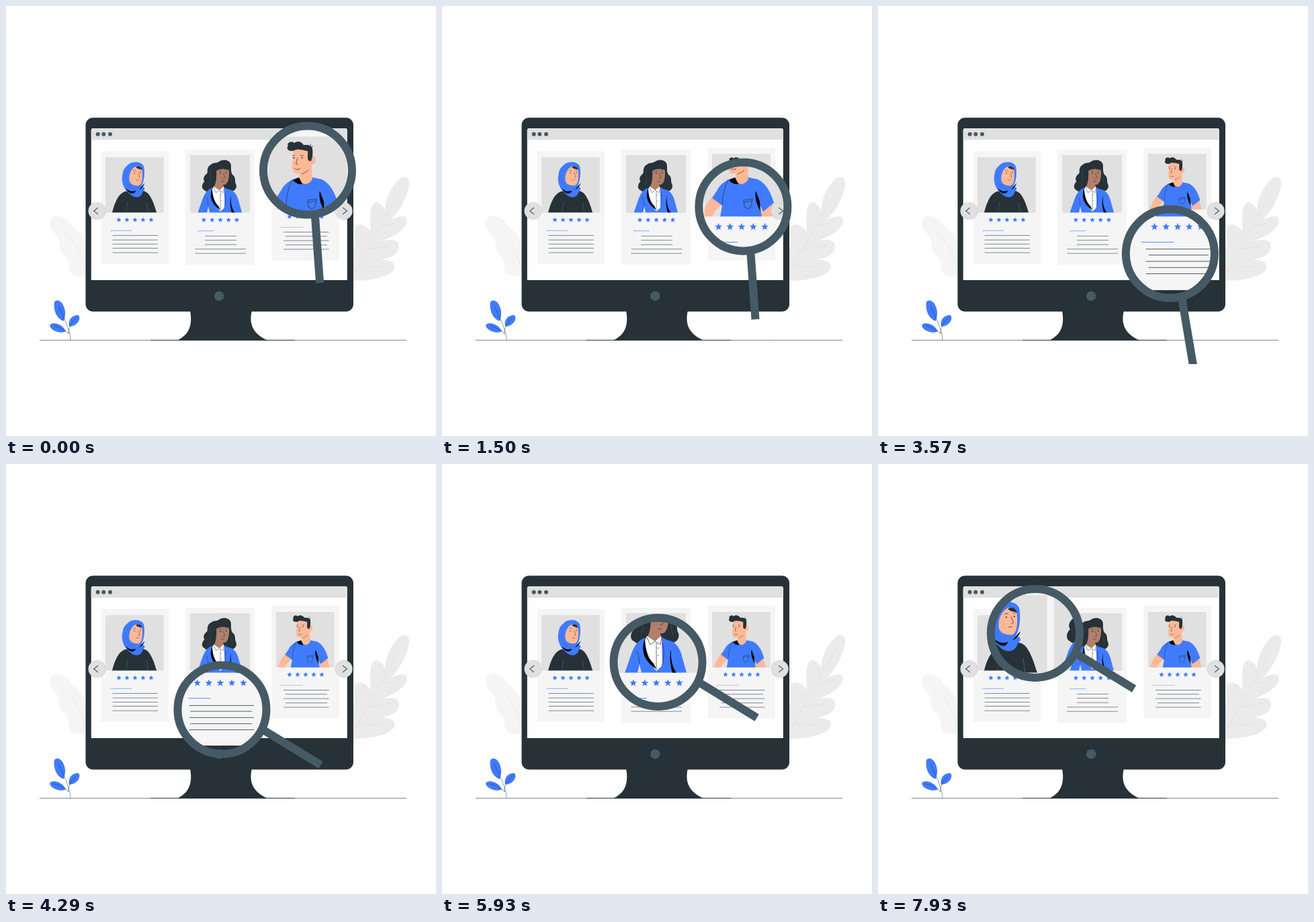
These frames come from a looping animation (640 by 640 pixels, 8 s). An HTML page with a canvas:

```html
<!DOCTYPE html>
<html lang="en">
<head>
<meta charset="utf-8">
<title>Profile search</title>
<style>
html, body { margin: 0; width: 100%; height: 100%; overflow: hidden; background: #fff; }
canvas { display: block; width: 640px; height: 640px; }
</style>
</head>
<body>
<canvas id="stage"></canvas>
<script>
const canvas = document.getElementById('stage');
const ctx = canvas.getContext('2d');
const ratio = window.devicePixelRatio || 1;
canvas.width = canvas.height = 640 * ratio;

const BLUE = '#407bff', DARK = '#263238', SLATE = '#455a64', PALE = '#f5f5f5',
  GREY = '#e0e0e0', BLACK = '#000', SKIN = '#ffb997', BROWN = '#b17f6b';
const LOOP = 8000, FPS = 14;

function fill(d, color) {
  ctx.fillStyle = color;
  ctx.fill(new Path2D(d));
}

function line(d, color = DARK, width = 0.7) {
  ctx.strokeStyle = color;
  ctx.lineWidth = width;
  ctx.stroke(new Path2D(d));
}

function box(x0, y0, x1, y1, color) {
  ctx.fillStyle = color;
  ctx.fillRect(x0, y0, x1 - x0, y1 - y0);
}

function roundBox(x0, y0, x1, y1, radii, color) {
  ctx.fillStyle = color;
  ctx.beginPath();
  ctx.roundRect(x0, y0, x1 - x0, y1 - y0, radii);
  ctx.fill();
}

function dot(x, y, r, color) {
  ctx.fillStyle = color;
  ctx.beginPath();
  ctx.arc(x, y, r, 0, Math.PI * 2);
  ctx.fill();
}

function star(x, y, r) {
  ctx.fillStyle = BLUE;
  ctx.beginPath();
  for (let i = 0; i < 10; i++) {
    const a = i * Math.PI / 5 - Math.PI / 2, q = i % 2 ? r * 0.45 : r;
    ctx.lineTo(x + q * Math.cos(a), y + q * Math.sin(a));
  }
  ctx.fill();
}

function zoom(x, y, s) {
  ctx.translate(x, y);
  ctx.scale(s, s);
  ctx.translate(-x, -y);
}

// Portraits are drawn at their magnified size.
function veiledWoman() {
  fill('M144 311C148 296 153 281 161 273Q170 264 180 266L206 265Q216 266 221 273C229 284 233 298 237 311Z', DARK);
  line('M177 288Q174 299 173 311M216 289L219 311', '#6b767b', 0.6);
  fill('M176 212C184 203 204 202 210 214C213 228 211 245 205 256C213 257 214 262 208 267C205 280 191 283 180 271C168 262 162 245 166 230C167 222 170 216 176 212Z', BLUE);
  fill('M194 214C203 214 206 219 207 225C208 240 206 252 200 254C190 255 182 252 180 244C178 232 184 218 194 214Z', SKIN);
  fill('M193 216C199 211 205 215 207 221L198 219Z', DARK);
  fill('M173 260C180 267 187 267 194 265L190 270C183 272 177 268 173 260Z', BLACK);
  fill('M212 249Q210 257 200 263Q207 254 212 249Z', BLACK);
  line('M172 232C170 244 176 254 186 260', '#2c5fd0', 0.5);
  dot(191, 228, 1.1, DARK);
  dot(203, 227, 1.1, DARK);
  line('M188 224Q191 221 194 223M201 222L205 222M198 227L202 236L198 238M194 242Q197 244 200 242');
}

function curlyWoman() {
  fill('M299 211C304 205 312 209 318 203C328 199 338 201 341 210C342 220 340 228 346 233C352 238 348 246 352 252C355 262 344 270 336 264C330 271 322 266 318 262L304 262C298 270 290 268 286 264C278 261 281 250 286 246C281 238 288 232 292 228C292 220 293 214 299 211Z', DARK);
  fill('M311 223Q323 217 337 222C338 236 336 246 331 251Q327 253 325 252L326 260L318 268L305 258C311 250 311 234 311 223Z', BROWN);
  fill('M305 256L300 266L318 306L321 310L328 302V262L326 256L317 264Z', '#fff');
  fill('M302 259C292 262 286 270 281 285L272 311H364L356 282C352 270 345 263 335 262L327 258L328 300L319 308C311 300 303 280 302 259Z', BLUE);
  fill('M291 311L294 298L297 311Z', GREY);
  fill('M302 260C296 276 299 292 319 305L315 297C306 289 302 276 302 260Z', BLACK);
  fill('M341 275C340 289 342 301 349 311H343C340 301 338 286 341 275Z', BLACK);
  line('M305 258L310 269L317 264L325 269L327 258M319 266V306M328 266Q333 284 327 301M294 297Q293 284 290 278');
  dot(321.5, 274, 0.7, DARK);
  dot(321.5, 285, 0.7, DARK);
  dot(319, 229, 1.2, DARK);
  dot(331, 228, 1.2, DARK);
  line('M315 225Q319 222 322 225M328 224L333 223M325 228L329 238L324 240M321 245Q324 247 327 245');
  line('M300 218C294 232 303 240 296 254M342 236Q340 246 345 256', '#4d5b62', 0.5);
}

function man() {
  fill('M404 281C396 291 389 302 387 314H402C404 306 412 300 418 294Z', SKIN);
  fill('M474 303L492 294L498 314H476Z', SKIN);
  fill('M430 257C421 261 415 264 409 275L402 286L417 297C416 303 415 308 414 314H476L473 296L478 306L494 293C490 280 484 265 470 258L456 255Q446 267 437 256Z', BLUE);
  fill('M428 210L426 238C425 247 430 251 437 249L437 260Q447 271 456 258L455 236C461 237 464 226 457 223L452 210Z', SKIN);
  fill('M429 215C421 218 416 212 420 208C417 203 426 200 429 204C434 200 440 202 443 207C450 206 455 208 456 212C457 220 456 226 454 231L450 230C448 225 450 220 449 216C440 214 434 212 429 215Z', DARK);
  line('M454 210L453 205M455 211L457 208');
  fill('M427 259L436 255L441 265Q432 266 427 259Z', BLACK);
  fill('M467 275C465 285 469 298 474 305L473 291Z', BLACK);
  line('M426 258C421 268 418 280 417 296M449 289L462 287L460 299L455 302L450 299ZM449 292L461 290');
  dot(428.5, 226, 1.1, DARK);
  dot(440.5, 226, 1.1, DARK);
  line('M426 223L430 222M438 222L443 223M434 226L431.5 235L435 236M430 242Q434 245 438 242M440 250Q447 248 450 244');
}

// s, fx, fy: magnification and the point it grows from.
const cards = [
  { frame: [395.5, 211, 496, 379], photo: [402, 220, 488.7, 302.8], stars: [422, 12, 313.5],
    title: [408, 442, 329.3], titleColor: '#9aa0a3', rows: [336.5, 342.7, 349.2, 355.6, 362],
    spans: i => i % 2 ? [416, 478] : [413, 480.5], s: 1.4375, fx: 446, fy: 278.7, person: man },
  { frame: [267, 214, 370, 385], photo: [274, 222, 363, 307.5], stars: [294.5, 12.25, 318.5],
    title: [285, 309, 334.7], rows: [342.4, 348.6, 355.2, 361.8, 368.2],
    spans: (i, big) => big ? (i % 2 ? [287, 352.5] : [286, 354.7]) : i < 3 ? [296, 343] : [281.5, 357],
    s: 1.4, fx: 319, fy: 299.8, person: curlyWoman },
  { frame: [141.5, 216, 242, 384], photo: [148, 225, 234.8, 307.5], stars: [168, 12, 318.3],
    title: [155.5, 187, 334.3], rows: [341.5, 348.2, 354.4, 360.5, 367.2],
    spans: () => [158.5, 226], s: 1.4, fx: 192.5, fy: 300, person: veiledWoman }
];

function drawCard(c, big) {
  ctx.save();
  if (big) zoom(c.fx, c.fy, c.s);
  box(...c.frame, PALE);
  box(...c.photo, GREY);

  ctx.save();
  const [x0, y0, x1, y1] = c.photo;
  ctx.beginPath();
  ctx.rect(x0, y0, x1 - x0, y1 - y0);
  ctx.clip();
  zoom(c.fx, c.fy, 1 / c.s);
  c.person();
  ctx.restore();

  const [sx, gap, sy] = c.stars;
  for (let i = 0; i < 5; i++) star(sx + i * gap, sy, 3.9);
  const [t0, t1, ty] = c.title;
  line(`M${t0} ${ty}H${t1}`, big ? BLUE : c.titleColor || BLUE, 0.6);
  c.rows.forEach((y, i) => {
    const [a, b] = c.spans(i, big);
    line(`M${a} ${y}H${b}`, DARK, 0.55);
  });
  ctx.restore();
}

function plants() {
  fill('M66 327C63 317 70 310 80 313C92 317 94 322 96 325C100 330 112 335 116 350L120 360V401C112 402 100 404 95 395C91 388 94 382 91 376C88 370 80 368 80 361C79 352 81 350 75 342C71 337 67 334 66 327Z', PALE);
  line('M88 336C102 348 112 370 118 392', '#e6e6e6', 0.8);
  fill('M517 409C540 409 572 404 578 391C582 381 568 376 552 378C575 376 585 368 585 358C585 346 570 347 558 350C572 346 597 333 597 319C596 310 584 313 572 318C585 308 600 280 600 263C600 254 592 252 585 258C575 267 566 282 564 304C562 296 552 289 547 294C541 300 542 318 543 336C538 328 527 322 521 327C517 331 519 340 520 350L517 360Z', '#ebebeb');
  line('M588 272C572 304 544 345 518 398M564 312L556 301M556 327Q575 326 586 320M543 349L530 335M536 361Q558 361 573 355M524 386Q545 390 564 387', '#e0e0e0', 0.8);

  line('M50 497.4H596', DARK, 0.6);
  fill('M86 469C76 466 70 453 72 441C74 436 82 438 85 445C89 453 89 460 86 469Z', BLUE);
  fill('M94 477C92 468 97 461 106 460C111 460 110 468 106 472C102 476 98 477 94 477Z', BLUE);
  fill('M89 484C84 488 70 485 66 478C63 473 70 471 76 473C82 475 86 478 89 484Z', BLUE);
  line('M96 497C96 484 88 468 78 447M94 488C88 483 80 478 71 476M93 488C92 479 99 469 105 464', DARK, 0.5);
}

function monitor() {
  fill('M274 453C277 470 276 488 255 497.6H389C368 488 361 474 366 453Z', DARK);
  line('M215 497.4H430', DARK, 0.8);
  roundBox(118.5, 166.3, 517, 454.7, 11, DARK);
  roundBox(126.8, 182, 507.8, 408, [3, 3, 0, 0], '#fff');
  roundBox(126.8, 182, 507.8, 199, [3, 3, 0, 0], GREY);
  for (const x of [136.7, 145.3, 155]) dot(x, 190.8, 3, SLATE);
  dot(317.3, 431.7, 7.2, SLATE);
}

function arrow(x, dir) {
  dot(x, 305, 13, '#cfcfcf');
  dot(x, 305, 12.4, GREY);
  line(`M${x - dir * 1.5} 300L${x + dir * 4.8} 305L${x - dir * 1.5} 310`, SLATE, 1.1);
}

const progress = (n, from, to) => Math.min(1, Math.max(0, (n - from) / (to - from)));

function lensAt(n) {
  const down = progress(n, 4, 43), left = progress(n, 49, 59),
    up = progress(n, 59, 97), on = progress(n, 104, 114);
  return {
    x: 449 - 1.5 * down - 126 * left - 125 * on,
    y: 244.6 + 124 * down - 116.7 * up,
    angle: (85.9 - 54.5 * left) * Math.PI / 180
  };
}

function drawLens({ x, y, angle }) {
  ctx.save();
  ctx.beginPath();
  ctx.rect(0, 0, 640, 533);
  ctx.clip();
  ctx.translate(x, y);
  ctx.strokeStyle = SLATE;
  ctx.lineWidth = 12;
  ctx.beginPath();
  ctx.arc(0, 0, 66, 0, Math.PI * 2);
  ctx.stroke();
  ctx.rotate(angle);
  box(66, -12.1, 168.6, -0.1, SLATE);
  ctx.restore();
}

function draw(n) {
  ctx.setTransform(ratio, 0, 0, ratio, 0, 0);
  box(0, 0, 640, 640, '#fff');
  plants();
  monitor();
  cards.forEach(c => drawCard(c, false));

  const lens = lensAt(n);
  ctx.save();
  ctx.beginPath();
  ctx.arc(lens.x, lens.y, 61, 0, Math.PI * 2);
  ctx.clip();
  cards.forEach(c => drawCard(c, true));
  ctx.restore();

  arrow(135.5, -1);
  arrow(502.7, 1);
  drawLens(lens);
}

const start = performance.now();
function tick() {
  const t = (performance.now() - start) % LOOP;
  draw(Math.floor((t + 5) * FPS / 1000) % (LOOP * FPS / 1000));
  requestAnimationFrame(tick);
}
tick();
</script>
</body>
</html>
```
